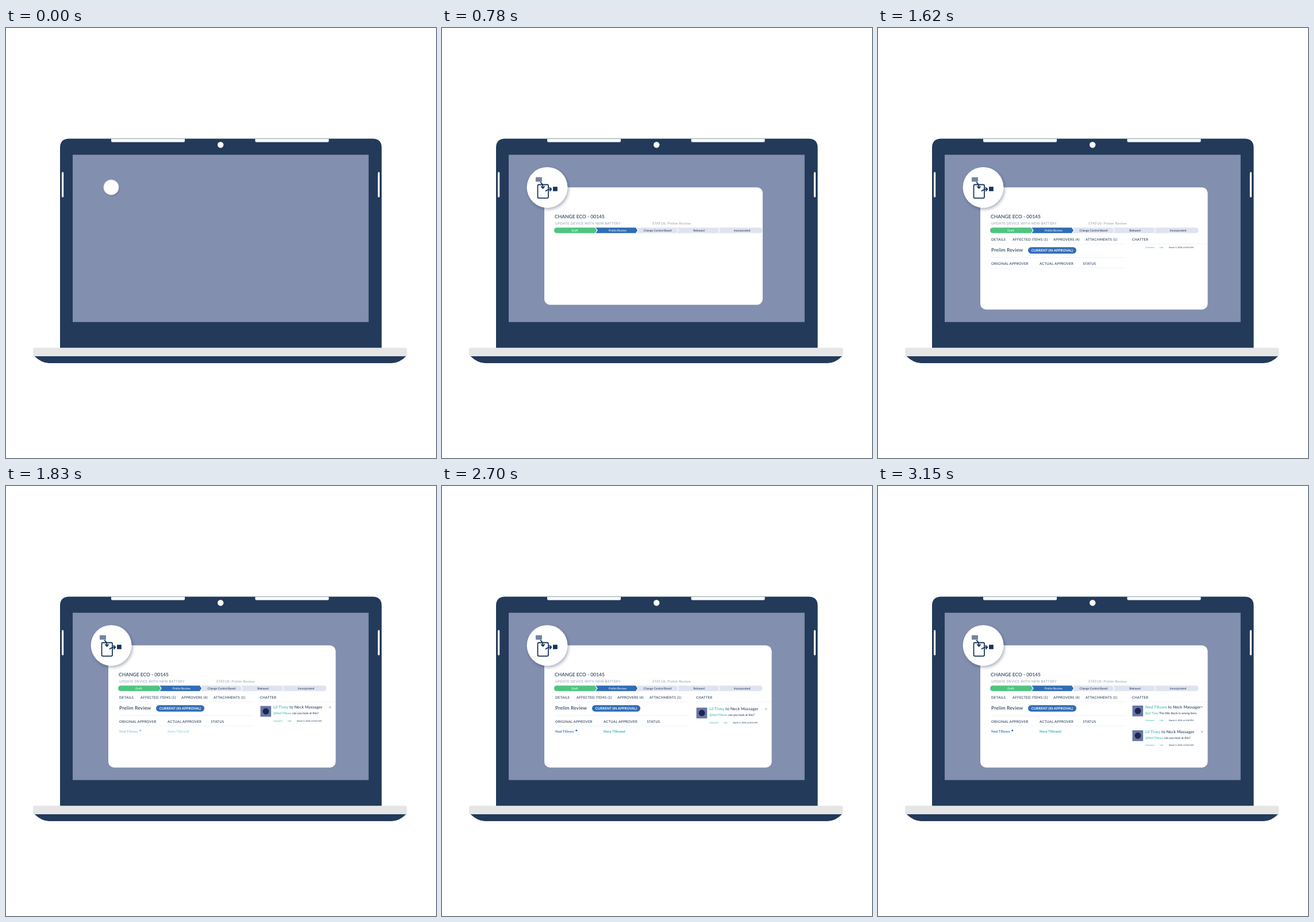
Recreate the animation shown at these times as an HTML page. Size 748x748 px, loop 5040 ms.

```html
<!DOCTYPE html>
<html lang="en">
<head>
<meta charset="utf-8">
<title>Change review on a laptop</title>
<style>
  html, body { margin: 0; width: 100%; height: 100%; overflow: hidden; background: #fff; }
  svg { display: block; width: 100%; height: 100%; }
  text { font: 500 6px Lato, sans-serif; letter-spacing: .25px; fill: #233a5a; text-rendering: geometricPrecision; }

  .navy { fill: #233a5a; }
  .white { fill: #fff; }
  .title { font-size: 8.5px; letter-spacing: 0; }
  .stage { font-size: 8.5px; letter-spacing: .17px; }
  .muted { fill: #97a1b5; }
  .steps text { font-size: 5px; letter-spacing: 0; text-anchor: middle; }
  .steps .on { fill: #fff; }
  .pill { font-size: 6px; font-weight: 700; letter-spacing: .05px; text-anchor: middle; fill: #fff; }
  .rule { stroke: #eef0f5; stroke-width: .8; }
  .person { font-weight: 700; letter-spacing: .1px; }
  .blue { fill: #3f78bd; }
  .teal { fill: #35b0b5; }
  .head { font-size: 7px; letter-spacing: .13px; }
  .body { font-size: 5.2px; letter-spacing: 0; }
  .meta { font-size: 3.7px; letter-spacing: 0; }
  .sketch { fill: none; stroke: #17345c; stroke-width: 1.8; stroke-linecap: round; stroke-linejoin: round; }

  .badge, .icon, .card, .tabs, .current, .columns, .people, .feed {
    animation: 5040ms linear infinite both;
  }
  .badge { transform-origin: 183px 277px; animation-name: badge; }
  .icon { transform-origin: 183px 277px; animation-name: icon; }
  .card { transform-origin: 178px 277.3px; animation-name: card; }
  .tabs { animation-name: tabs; }
  .current { animation-name: current; }
  .columns { animation-name: columns; }
  .people { animation-name: people; }
  .feed { animation-name: feed; }

  @keyframes badge {
    0% { transform: scale(.37); animation-timing-function: cubic-bezier(.33, .46, .63, 1); }
    4.7%, 100% { transform: none; }
  }
  @keyframes icon {
    0%, 2.4% { transform: scale(.6); opacity: 0; animation-timing-function: ease-out; }
    7.2%, 100% { transform: none; opacity: 1; }
  }
  @keyframes card {
    0%, 5.04% { transform: scale(0); animation-timing-function: cubic-bezier(.37, 0, .63, 1); }
    17.04%, 100% { transform: none; }
  }
  @keyframes tabs { 0%, 17.5% { opacity: 0; } 20.8%, 100% { opacity: 1; } }
  @keyframes current { 0%, 19.8% { opacity: 0; } 23.4%, 100% { opacity: 1; } }
  @keyframes columns { 0%, 22.4% { opacity: 0; } 26.2%, 100% { opacity: 1; } }
  @keyframes people { 0%, 34.1% { opacity: 0; } 38.9%, 100% { opacity: 1; } }
  @keyframes feed {
    0%, 26.9% { transform: translateY(-60px); animation-timing-function: cubic-bezier(.37, 0, .63, 1); }
    36.8%, 52.2% { transform: none; animation-timing-function: cubic-bezier(.37, 0, .63, 1); }
    60.9%, 100% { transform: translateY(42px); }
  }
</style>
</head>
<body>
<svg viewBox="0 0 748 748">
  <defs>
    <clipPath id="cardClip"><rect class="card" x="178" y="277.3" width="395.5" height="212.5" rx="10"/></clipPath>
    <clipPath id="feedClip"><rect x="438" y="378" width="135" height="108"/></clipPath>
    <clipPath id="barClip"><rect x="195" y="347.2" width="362.5" height="9.6" rx="4.8"/></clipPath>
    <filter id="shadow" x="-30%" y="-30%" width="160%" height="160%">
      <feDropShadow dx="2" dy="3" stdDeviation="2.5" flood-color="#1d2c50" flood-opacity=".35"/>
    </filter>
  </defs>

  <!-- Laptop -->
  <path class="navy" d="M94 557V208.500Q94 192.500 110 192.500H637.500Q653.500 192.500 653.500 208.500V557Z"/>
  <rect x="116" y="220.500" width="514.800" height="291" fill="#838faf"/>
  <g class="white">
    <path d="M183 193H311V196Q311 198.600 308.500 198.600H185.500Q183 198.600 183 196Z"/>
    <path d="M433.500 193H561.500V196Q561.500 198.600 559 198.600H436Q433.500 198.600 433.500 196Z"/>
    <circle cx="373.200" cy="203.200" r="5.200"/>
    <rect x="97" y="250.500" width="3.200" height="44" rx="1.500"/>
    <rect x="646.800" y="250.500" width="3.200" height="44" rx="1.500"/>
  </g>
  <path class="navy" d="M49 570.500Q62 583 75 583H671Q684 583 696.500 570.500Z"/>
  <rect x="47" y="556.300" width="650.500" height="14.700" rx="3" fill="#e6e6e6"/>

  <!-- Record card -->
  <g clip-path="url(#cardClip)">
    <rect class="white" x="178" y="277" width="396" height="213"/>
    <text class="title" x="196" y="331.300">CHANGE ECO - 00145</text>
    <text class="muted" x="197" y="342.100">UPDATE DEVICE WITH NEW BATTERY</text>
    <text class="muted" x="366" y="342.100">STATUS: Prelim Review</text>

    <g class="steps">
      <g clip-path="url(#barClip)">
        <rect x="195" y="347" width="363" height="10" fill="#dfe3ef"/>
        <path d="M267 347H337L340.500 352L337 357H267Z" fill="#2f6db5"/>
        <path d="M195 347H266L269.500 352L266 357H195Z" fill="#4fc480"/>
        <path d="M266.500 347l3.500 5l-3.500 5M337.500 347l3.500 5l-3.500 5M408 347l3.500 5l-3.500 5M479.500 347l3.500 5l-3.500 5"
              fill="none" stroke="#fff" stroke-width="1.300"/>
      </g>
      <text class="on" x="231" y="353.700">Draft</text>
      <text class="on" x="305.500" y="353.700">Prelim Review</text>
      <text x="375" y="353.700">Change Control Board</text>
      <text x="447" y="353.700">Released</text>
      <text x="522" y="353.700">Incorporated</text>
    </g>

    <g class="tabs">
      <text x="197" y="369.700">DETAILS</text>
      <text x="234" y="369.700">AFFECTED ITEMS (1)</text>
      <text x="305" y="369.700">APPROVERS (4)</text>
      <text x="361" y="369.700">ATTACHMENTS (1)</text>
      <text x="442" y="369.700">CHATTER</text>
      <path class="rule" d="M196 375.500H430M441 375.500H573"/>
    </g>

    <g class="current">
      <text class="stage" x="197" y="389.400">Prelim Review</text>
      <rect x="261" y="381.200" width="84" height="11.300" rx="5.600" fill="#2f6db5"/>
      <text class="pill" x="303" y="389">CURRENT (IN APPROVAL)</text>
      <path class="rule" d="M196 399.500H430"/>
    </g>

    <g class="columns">
      <text x="197" y="412.100">ORIGINAL APPROVER</text>
      <text x="281" y="412.100">ACTUAL APPROVER</text>
      <text x="356.500" y="412.100">STATUS</text>
      <path class="rule" d="M196 417.500H430"/>
    </g>

    <g class="people">
      <text class="person blue" x="197" y="428.900">Ned Tillows</text>
      <circle cx="233.800" cy="425.300" r="1.500" fill="#2f6db5"/>
      <text class="person teal" x="281" y="428.900">Nora Tilbrand</text>
    </g>

    <g clip-path="url(#feedClip)">
      <g class="feed">
        <g>
          <rect x="442.500" y="383" width="18.700" height="18.700" fill="#6677a5"/>
          <circle cx="452" cy="392.300" r="5.500" fill="#20244f"/>
          <text class="head" x="465" y="387.600"><tspan class="teal">Lil Tivey</tspan> to Neck Massager</text>
          <text class="body" x="465" y="397.700"><tspan class="teal">@Ned Tillows</tspan> can you look at this?</text>
          <text class="meta" x="465" y="410.300"><tspan class="teal">Comment</tspan><tspan class="teal" x="490">Like</tspan><tspan x="506">March 3, 2024 at 8:53 AM</tspan></text>
          <path d="M562 384l3 3m0-3l-3 3" stroke="#7c879f" stroke-width=".8"/>
        </g>
        <g transform="translate(0 -43)">
          <rect x="442.500" y="383" width="18.700" height="18.700" fill="#6677a5"/>
          <circle cx="452" cy="392.300" r="5.500" fill="#20244f"/>
          <text class="head" x="465" y="387.600"><tspan class="teal">Ned Tillows</tspan> to Neck Massager</text>
          <text class="body" x="465" y="397.700"><tspan class="teal">@Lil Tivey</tspan> The title block is wrong here.</text>
          <text class="meta" x="465" y="410.300"><tspan class="teal">Comment</tspan><tspan class="teal" x="490">Like</tspan><tspan x="506">March 4, 2024 at 3:50 PM</tspan></text>
          <path d="M562 384l3 3m0-3l-3 3" stroke="#7c879f" stroke-width=".8"/>
        </g>
      </g>
    </g>
  </g>

  <!-- Round badge -->
  <g class="badge">
    <circle class="white" cx="183" cy="277.300" r="35.400" filter="url(#shadow)"/>
  </g>
  <g class="icon">
    <g class="sketch">
      <path d="M163.500 261H173.500M163.500 263.500H173.500M163.500 266H173.500" stroke-width="1.400"/>
      <rect x="166.500" y="272.500" width="18.500" height="23.300" rx="2"/>
      <path d="M171.500 268.500Q175.500 271.500 175.500 278M172.800 276L175.500 278.800L178 275.800"/>
      <path d="M180.500 283.500Q184 280.300 190 280.300M187.300 277.700L190.300 280.300L187.800 283.300"/>
    </g>
    <rect x="193" y="276.200" width="7.800" height="7.600" fill="#17345c"/>
  </g>
</svg>
</body>
</html>
```
